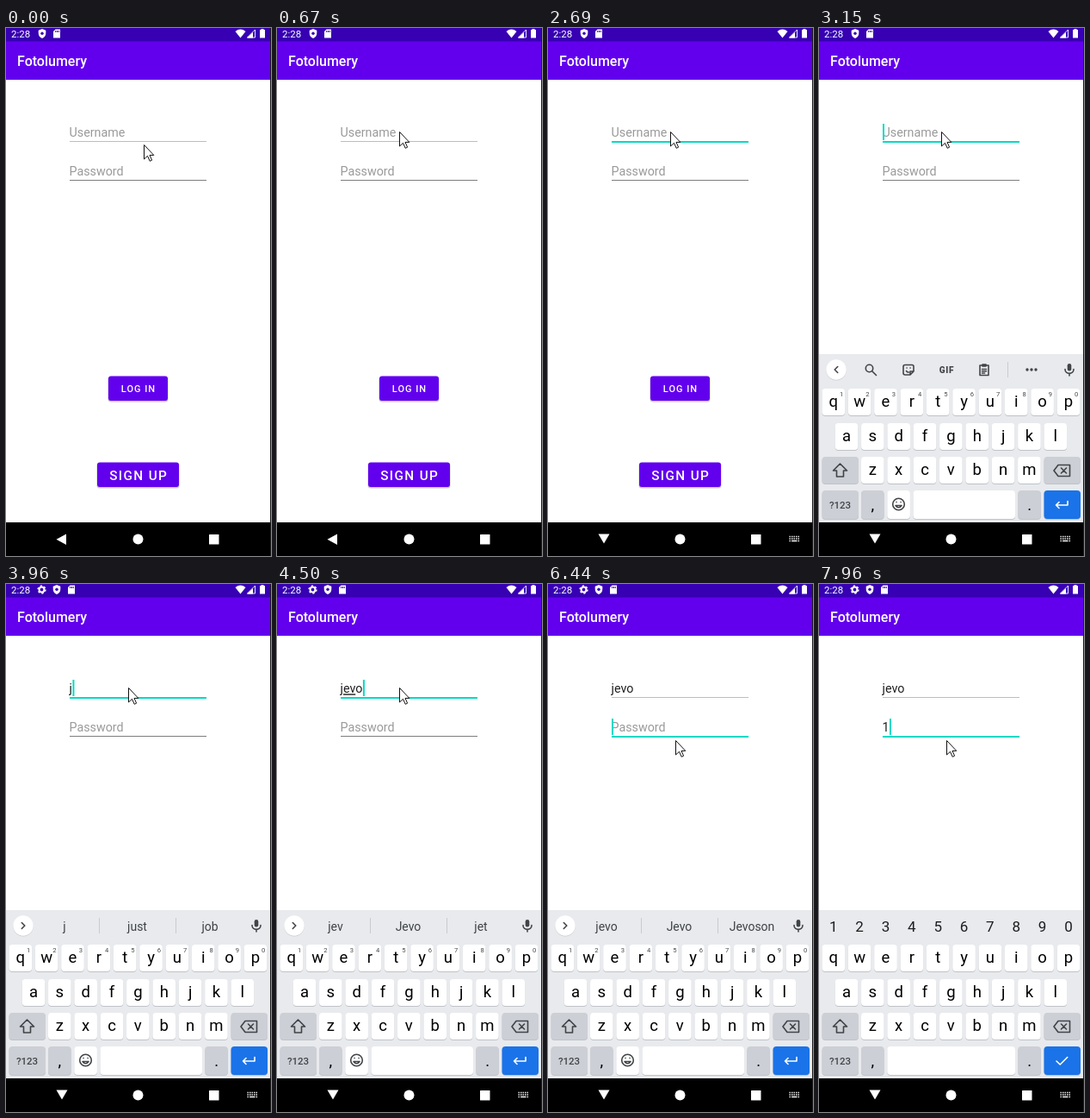
An HTML page for the animation above (8000 ms loop, 308 px wide and 612 px high).

```html
<!DOCTYPE html>
<html lang="en">
<head>
<meta charset="utf-8">
<title>Login screen</title>
<style>
html, body { margin: 0; width: 100%; height: 100%; overflow: hidden; background: #fff; }
svg { display: block; width: 308px; height: 612px; font-family: Roboto, sans-serif; }
.mid { text-anchor: middle; }
.field { font-size: 14.3px; fill: #212121; }
.hint { fill: #9a9a9a; }
.btn { font-weight: 500; fill: #fff; letter-spacing: .0893em; }
.key { font-size: 18.5px; fill: #000; }
.num { font-size: 7.6px; fill: #44474b; }
.sug { font-size: 14px; fill: #3f4246; }
.teal { fill: #03dac5; }
.line { fill: none; stroke: #414447; stroke-width: 1.6; stroke-linejoin: round; stroke-linecap: round; }
.white { stroke: #fff; }
.under { text-decoration: underline; }
</style>
</head>
<body>
<svg viewBox="0 0 308 612">
  <rect width="308" height="612" fill="#fff"/>
  <rect width="308" height="16" fill="#3700b3"/>
  <rect y="15.5" width="308" height="44.5" fill="#6200ee"/>

  <!-- status bar -->
  <g fill="#fff">
    <text x="6" y="10.5" font-size="11.5">2:28</text>
    <g data-on="3840-8000" transform="translate(41.5 6.5)">
      <circle r="2.9" fill="none" stroke="#fff" stroke-width="2"/>
      <circle r="4.3" fill="none" stroke="#fff" stroke-width="1.7" stroke-dasharray="2.1 2.4"/>
    </g>
    <g id="badges">
      <path d="M42 1l4.3 1.7v3.2c0 2.7-1.7 5-4.3 6.1c-2.6-1.1-4.3-3.4-4.3-6.1V2.7z"/>
      <circle cx="42" cy="6.3" r="1.7" fill="#3700b3"/>
      <path d="M57.5 1.5H63v10h-8V4z"/>
      <path d="M57.7 3v2M59.5 3v2M61.3 3v2" stroke="#3700b3"/>
    </g>
    <path d="M266.500 4q6-4.800 12 0l-6 7.500zM287 5v6.500h-7zM296.500 1h3v1h1.500v9.500h-6V2h1.500z"/>
    <path d="M289.500 2v9h-9z" fill="none" stroke="#fff" stroke-width=".9"/>
    <text x="13" y="44" font-size="16" font-weight="500">Fotolumery</text>
  </g>

  <!-- form -->
  <rect id="line1" x="74" width="159"/>
  <rect id="line2" x="74" width="159"/>
  <text class="field hint" x="73.5" y="126.3" data-on="0-3570">Username</text>
  <text class="field hint" x="73.5" y="171" data-on="0-7960">Password</text>
  <text class="field" id="user" x="73.5" y="126.3"><tspan class="under"></tspan><tspan></tspan></text>
  <text class="field" x="73.5" y="171" data-on="7960-8000">1</text>
  <rect class="teal" id="caret1" y="111" width="2" height="19" data-on="2120-2690 3150-5060"/>
  <rect class="teal" id="caret2" y="156" width="2" height="19" data-on="6170-6560 6990-7550 7960-8000"/>
  <g id="buttons"></g>

  <!-- keyboard -->
  <g data-on="3150-8000">
    <rect y="378" width="307" height="195" fill="#e8eaed"/>
    <g data-on="3150-7140">
      <circle cx="20" cy="396.8" r="11.7" fill="#c9ccd0"/>
      <circle cx="20" cy="396" r="11.7" fill="#fff"/>
      <path class="line" d="M21.7 392.5l-3.5 3.5l3.5 3.5" data-on="3150-3840"/>
      <path class="line" d="M18.3 392.5l3.5 3.5l-3.5 3.5" data-on="3840-7140"/>
      <rect x="288.7" y="389" width="4.6" height="8.5" rx="2.3" fill="#414447"/>
      <path class="line" d="M286 395.5c0 6.5 10 6.5 10 0M291 400.5v2.5"/>
    </g>
    <g data-on="3150-3840">
      <g class="line">
        <circle cx="58.5" cy="394.5" r="4.2"/>
        <path d="M61.7 397.7l4.8 4.8"/>
        <path d="M100 390.5h8q2 0 2 2v5.500l-4 4h-6q-2 0-2-2v-7.500q0-2 2-2zM110 398h-4v4M101.500 397.500q1.200 1.800 2.800 1.500M102 394h.1M106 394h.1"/>
        <path d="M187 391h10v11.500h-10zM190 390h4v2h-4zM189.500 395.500h5M189.500 397.700h5M189.500 400h3"/>
      </g>
      <text class="mid" x="148.5" y="399.5" font-size="10" font-weight="900" letter-spacing=".8" fill="#414447">GIF</text>
      <path d="M219.500 387v18" stroke="#c8cbd0"/>
      <path d="M242 396h.01M247 396h.01M252 396h.01" class="line" style="stroke-width:3.4"/>
    </g>
    <g data-on="3840-6560">
      <path d="M108.500 387v18M197.500 387v18" stroke="#c8cbd0"/>
      <g id="sugs" class="sug mid">
        <text x="68" y="401.5"></text><text x="152.5" y="401.5"></text><text x="237" y="401.5"></text>
      </g>
    </g>
    <g id="digits" class="mid" data-on="7140-8000"></g>
    <g id="keys" class="mid"></g>
    <g id="hints" class="mid" data-on="3150-7140"></g>
    <g class="line">
      <path d="M24.500 505l8 8h-4v7h-8v-7h-4z"/>
      <path d="M278 506.500h13.500v13h-13.500l-5-6.500zM281.500 510l6 6M287.500 510l-6 6"/>
      <g data-on="3150-7140">
        <circle cx="92.500" cy="552" r="6.800"/>
        <path d="M89 553.500q3.500 4.500 7 0zM90 549.500h.1M95 549.500h.1"/>
        <path class="white" d="M289 548.500v4.500h-13.500M279 549.500l-3.500 3.500l3.500 3.500"/>
      </g>
      <path class="white" d="M276 553l4.200 4l8.500-8.500" data-on="7140-8000"/>
    </g>
  </g>

  <!-- navigation bar -->
  <rect y="573" width="308" height="39" fill="#000"/>
  <g fill="#fff">
    <path d="M70 586.500v12.500l-11.500-6.250z" data-on="0-2270"/>
    <path d="M58.500 586.500h13l-6.500 11z" data-on="2270-8000"/>
    <circle cx="153.500" cy="592.500" r="6"/>
    <rect x="236" y="587" width="11.500" height="11.500" rx=".5"/>
    <g data-on="1290-8000" fill="none" stroke="#fff" stroke-width="1.4">
      <path d="M280.500 589.500h11.500M280.500 592h11.500" stroke-dasharray="1.4 1.1"/>
      <path d="M280.500 594.500h1.400M283 594.500h6.500M290.600 594.500h1.400"/>
    </g>
  </g>
  <rect x="307" width="1" height="612" fill="#1c1c1c"/>
  <path id="mouse" d="M.5.5V17l4-3.700l2.700 6l2.400-1.100l-2.600-5.800h4.800z" fill="#fff" stroke="#111"/>
</svg>
<script>
const LOOP = 8000;
const $ = id => document.getElementById(id);

function add(parent, tag, attrs, text = '') {
  const el = document.createElementNS('http://www.w3.org/2000/svg', tag);
  set(el, attrs);
  el.textContent = text;
  return $(parent).appendChild(el);
}

function set(el, attrs) {
  for (const name in attrs) el.setAttribute(name, attrs[name]);
}

function button(x, y, w, label, size) {
  add('buttons', 'rect', { x: x - .5, y: y + .5, width: w + 1, height: 29.5, rx: 3.5, fill: '#000', opacity: .22 });
  add('buttons', 'rect', { x, y, width: w, height: 28.5, rx: 3, fill: '#6200ee' });
  add('buttons', 'text', { x: x + w / 2 + size * .045, y: y + 14.5 + size * .36, class: 'btn mid', 'font-size': size }, label);
}

function key(x, y, w, fill = '#fff', on) {
  const h = y > 530 ? 33 : 31;
  for (const [dy, color] of [[1, '#bfc2c7'], [0, fill]]) {
    const el = add('keys', 'rect', { x, y: y + dy, width: w, height: h, rx: 4, fill: color });
    if (on) el.dataset.on = on;
  }
}

function row(letters, x, y) {
  [...letters].forEach((c, i) => {
    const cx = x + i * 30.35;
    key(cx - 13.3, y, 26.6);
    add('keys', 'text', { x: cx, y: y + 20.7, class: 'key' }, c);
  });
}

button(119, 403.5, 69, 'LOG IN', 11);
button(106, 503.5, 95, 'SIGN UP', 15.3);

row('qwertyuiop', 16.8, 418);
row('asdfghjkl', 32, 458);
row('zxcvbnm', 62.3, 497);
const gray = '#cccfd5';
key(3.5, 497, 42.5, gray);
key(261.5, 497, 42.5, gray);
key(3.5, 536, 42.5, gray);
key(49, 536, 26.6, gray);
key(109.5, 536, 118.5, '#fff', '3150-7140');
key(79.3, 536, 26.6, '#fff', '3150-7140');
key(79.3, 536, 148.7, '#fff', '7140-8000');
key(231.3, 536, 26.6, gray);
key(261.5, 536, 42.5, '#1a73e8');
add('keys', 'text', { x: 24.5, y: 557, 'font-size': 11.5, 'font-weight': 500, fill: '#414447' }, '?123');
add('keys', 'text', { x: 62.3, y: 559, class: 'key' }, ',');
add('keys', 'text', { x: 244.6, y: 559, class: 'key' }, '.');
[...'1234567890'].forEach((c, i) => {
  const cx = 16.8 + i * 30.35;
  add('digits', 'text', { x: cx, y: 402.8, 'font-size': 17, fill: '#1c1d1f' }, c);
  add('hints', 'text', { x: cx + 9.3, y: 426.5, class: 'num' }, c);
});

// Each track lists [time, ...values]; a value holds until the next entry.
const mouse = [[0, 160, 135], [120, 157, 124], [300, 150, 112], [490, 144, 116], [670, 142, 120],
  [5060, 146, 125], [5200, 156, 138], [5330, 164, 151], [5460, 165, 160], [5600, 162, 165], [6030, 148, 181]];
const typed = [[0, 0], [3570, 1], [3970, 2], [4230, 3], [4500, 4]];
const composed = [[0, 0], [3840, 1], [4100, 2], [4370, 3], [4780, 4], [6170, 0]];
const words = [[0, '', '', ''], [3840, 'j', 'just', 'job'], [4100, 'je', 'Jet', 'jeans'],
  [4370, 'jev', 'Jevo', 'jet'], [4780, 'jevo', 'Jevo', 'Jevoson']];
const focus = [[0, 0], [1290, 1], [6170, 2]];

const hold = (track, t) => track.findLast(k => k[0] <= t).slice(1);

const timed = [...document.querySelectorAll('[data-on]')].map(el => ({
  el, spans: el.dataset.on.split(' ').map(s => s.split('-').map(Number))
}));

function underline(el, y, active, color) {
  set(el, active ? { y, height: 2, fill: '#03dac5' } : { y, height: 1, fill: color });
}

function draw(t) {
  for (const { el, spans } of timed) {
    el.style.display = spans.some(([a, b]) => t >= a && t < b) ? '' : 'none';
  }
  const [x, y] = hold(mouse, t);
  set($('mouse'), { transform: `translate(${x} ${y})` });

  const name = 'jevo'.slice(0, hold(typed, t)[0]);
  const cut = hold(composed, t)[0];
  const [marked, rest] = $('user').children;
  marked.textContent = name.slice(0, cut);
  rest.textContent = name.slice(cut);
  set($('caret1'), { x: name ? 74 + $('user').getComputedTextLength() : 74 });
  set($('caret2'), { x: t < 7960 ? 74 : 82 });

  const [active] = hold(focus, t);
  underline($('line1'), 131, active === 1, '#bdbdbd');
  underline($('line2'), 176, active === 2, '#7d7d7d');

  const list = hold(words, t);
  [...$('sugs').children].forEach((el, i) => el.textContent = list[i]);
  set($('badges'), { transform: `translate(${t < 3840 ? 0 : 17} 0)` });
}

const start = performance.now();
function tick() {
  draw((performance.now() - start) % LOOP);
  requestAnimationFrame(tick);
}
tick();
</script>
</body>
</html>
```
